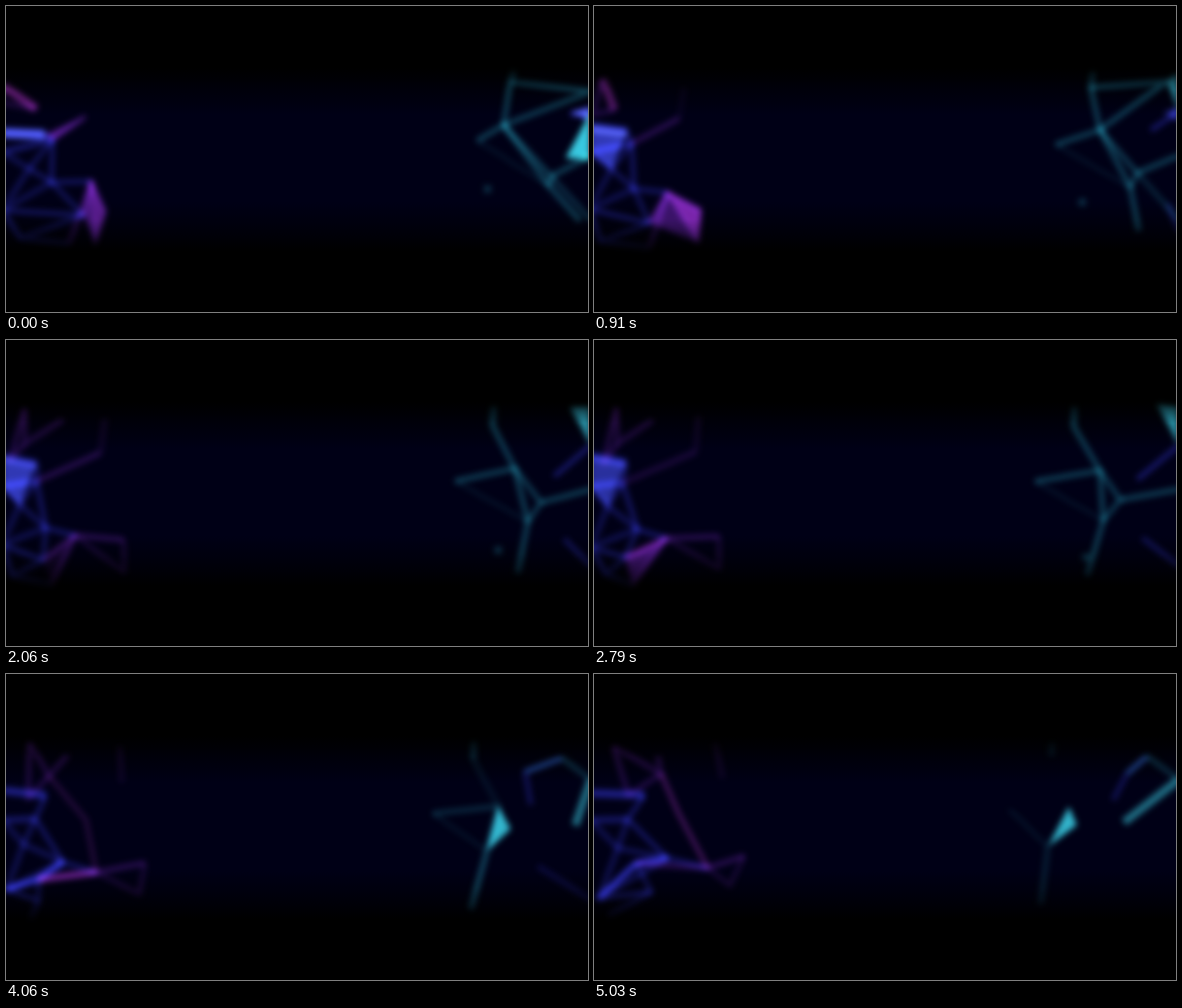
These frames come from a looping animation (600 px wide and 316 px high, 5060 ms). An HTML page with a canvas:

```html
<!DOCTYPE html>
<html lang="en">
<head>
<meta charset="utf-8">
<title>Plexus banner</title>
<style>
  html, body { margin: 0; width: 100%; height: 100%; overflow: hidden; background: #000; }
  #band {
    position: absolute; left: 0; top: 0; width: 600px; height: 316px; overflow: hidden;
    background: linear-gradient(#000 64px, #00000b 88px, #000016 112px, #000016 202px, #00000c 228px, #000 254px);
  }
  #fade {
    position: absolute; inset: 0;
    -webkit-mask-image: linear-gradient(transparent 58px, #000 86px, #000 220px, transparent 264px);
    mask-image: linear-gradient(transparent 58px, #000 86px, #000 220px, transparent 264px);
  }
  canvas { position: absolute; left: -20px; top: 0; filter: blur(3px); }
</style>
</head>
<body>
<div id="band"><div id="fade"><canvas id="view" width="640" height="316"></canvas></div></div>
<script>
const LOOP = 5060;
const CYAN = '#38c8e0', TEAL = '#1e7f9a', BLUE = '#3032d0', GLOW = '#4450f8',
      PURPLE = '#6a22b0', PINK = '#9c2cb4';
const ctx = document.getElementById('view').getContext('2d');
const parts = [];

const clamp = v => Math.max(0, Math.min(1, v));

// Parabola through a start, a middle and an end; u runs from 0 to 1 over the loop.
const arc = (x0, y0, x1, y1, x2, y2) => u => {
  const p = (1 - u) * (1 - 2 * u), q = 4 * u * (1 - u), r = u * (2 * u - 1);
  return [p * x0 + q * x1 + r * x2, p * y0 + q * y1 + r * y2];
};
const glide = (x0, y0, x1, y1) => u => [x0 + (x1 - x0) * u, y0 + (y1 - y0) * u];
const pin = (x, y) => () => [x, y];

// Parts are visible between `from` and `to`, with soft ramps inside both ends.
function link(color, strength, nodes, { width = 5, from = -1, to = 2 } = {}) {
  parts.push({ color, strength, nodes, width, from, to });
}
const face = (color, strength, nodes, span) => link(color, strength, nodes, { ...span, width: 0 });

// Right cluster
const A = arc(520,78, 497,89, 471,84), top1 = glide(524,66, 472,70);
const B = arc(513,123, 523,134, 489,137);
const C = arc(486,139, 458,146, 428,140);
const D = arc(560,186, 530,187, 467,178);
const H = arc(562,176, 546,166, 497,156);
const F = arc(592,222, 515,243, 460,238);
const G = arc(604,88, 580,66, 597,64);
const L = arc(604,200, 569,205, 535,190);
const K = arc(582,112, 562,143, 548,130);
const M = glide(475,93, 550,103), N = glide(585,95, 570,85), M2 = glide(566,155, 535,130);
const P = arc(560,120, 614,152, 545,153);
const hub = pin(603,109), side = pin(604,154), corner = pin(602,68);
const spark = arc(493,189, 504,222, 490,240);
const sparkEnd = u => [spark(u)[0] + 7, spark(u)[1]];

link(TEAL, .5, [top1, A, B], { to: .85 });
link(TEAL, .2, [top1, A], { from: .6 });
link(TEAL, .5, [C, B, D], { to: .9 });
link(TEAL, .45, [B, H, D], { to: .7 });
link(TEAL, .2, [C, D], { width: 3 });
link(TEAL, .5, [D, F], { to: .9 });
link(TEAL, .25, [D, F], { from: .65 });
link(TEAL, .5, [H, side], { to: .8 });
link(TEAL, .5, [B, G, A], { to: .35 });
link(TEAL, .35, [H, pin(604,222)], { to: .3 });
link(TEAL, .4, [spark, sparkEnd], { width: 7, to: .7 });
link(BLUE, .45, [hub, K], { to: .75 });
link(BLUE, .35, [L, pin(604,234)], { from: .05, to: .9 });
link(BLUE, .25, [H, hub], { from: .55, to: .8, width: 3 });
link(TEAL, .35, [M, N, hub], { from: .55 });
link(BLUE, .35, [M2, M, N], { from: .6 });
link(CYAN, .55, [P, hub], { from: .63, width: 8 });
face(CYAN, 1, [hub, glide(577,157, 560,190), pin(602,159)], { to: .17 });
face(GLOW, 1, [glide(582,110, 610,112), pin(603,104), pin(603,119)], { to: .25 });
face(CYAN, .7, [G, corner, hub], { from: .05, to: .75 });
face(CYAN, .9, [B, D, H], { from: .57 });

// Left cluster
const a = arc(31,106, 22,107, 70,103), a0 = arc(-4,82, 22,69, 20,75);
const a1 = glide(54,80, 66,85), a2 = glide(60,175, 88,145), a3 = arc(-4,100, 8,126, 36,125);
const b = arc(40,133, 32,127, 52,125), b0 = arc(-4,131, -4,120, -4,123);
const c = arc(48,138, 30,147, 35,150), c0 = pin(-4,151);
const d = arc(82,114, 102,116, 133,107), d1 = glide(86,88, 125,70);
const e = arc(47,182, 43,195, 76,190);
const j = arc(88,181, 73,204, 118,200);
const k = arc(102,213, 126,204, 155,188);
const m = arc(92,246, 127,238, 140,218);
const n = arc(80,216, 34,226, 44,195);
const o = arc(-4,211, -4,213, 5,232);
const p = arc(65,246, 42,254, 14,250);
const q = arc(24,168, 14,171, 25,180);
const r = arc(15,240, 10,243, 60,225);

link(PINK, .6, [a0, a], { to: .3, width: 8 });
link(PURPLE, .3, [a0, a, a1], { from: .25 });
link(PURPLE, .3, [a0, a3, a]);
link(PINK, .4, [a, a2, j], { from: .72 });
link(BLUE, .6, [b0, b], { width: 8 });
link(GLOW, .8, [b0, b], { width: 10, to: .25 });
link(BLUE, .4, [c0, c], { width: 7 });
link(PURPLE, .4, [c, d], { to: .65 });
link(PURPLE, .15, [d, d1], { from: .1 });
link(BLUE, .4, [b, c, e, j]);
link(BLUE, .35, [c, q, e, n]);
link(BLUE, .3, [c0, q, o, e], { width: 6 });
link(BLUE, .4, [n, o, r]);
link(BLUE, .3, [n, r, p]);
link(BLUE, .45, [e, n, o], { from: .65, width: 7 });
link(PURPLE, .4, [n, j, k]);
link(PINK, .55, [n, j], { from: .5, to: .92, width: 7 });
link(PURPLE, .25, [k, m, j], { width: 4 });
link(PURPLE, .35, [j, p], { to: .8 });
face(PURPLE, .7, [b, d, c], { to: .15 });
face(GLOW, .7, [b0, b, q, c0], { from: .02, to: .68 });
face(PURPLE, .55, [j, k, m, n], { to: .35 });
face(PINK, .4, [j, k, m], { from: -.05, to: .33 });
face(PURPLE, .7, [n, j, p], { from: .38, to: .67 });

function draw(u) {
  ctx.setTransform(1, 0, 0, 1, 0, 0);
  ctx.clearRect(0, 0, 640, 316);
  ctx.translate(20, 0);
  ctx.globalCompositeOperation = 'lighter';
  ctx.lineJoin = 'round';
  for (const { color, strength, nodes, width, from, to } of parts) {
    ctx.globalAlpha = strength * clamp((u - from) / .15) * clamp((to - u) / .15);
    ctx.beginPath();
    for (const at of nodes) ctx.lineTo(...at(u));
    if (width) {
      ctx.strokeStyle = color;
      ctx.lineWidth = width;
      ctx.stroke();
    } else {
      ctx.fillStyle = color;
      ctx.fill();
    }
  }
}

const start = performance.now();
function tick() {
  draw((performance.now() - start) % LOOP / LOOP);
  requestAnimationFrame(tick);
}
tick();
</script>
</body>
</html>
```
